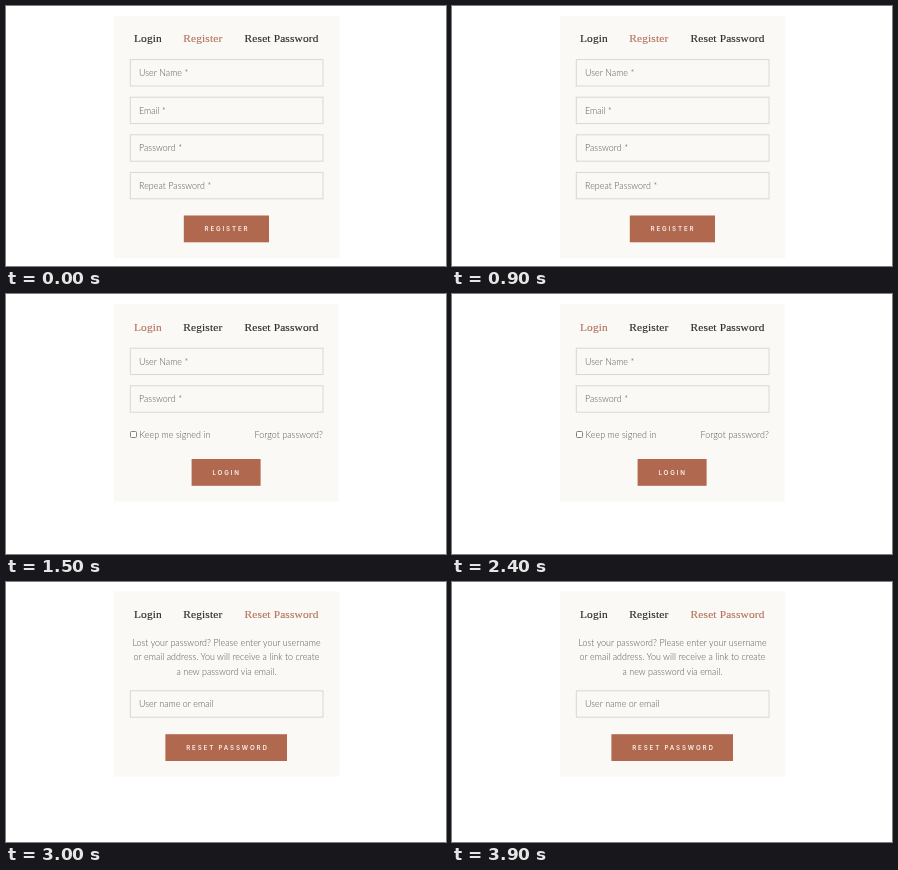
Write an HTML page that moves like this. It is 440 px wide and 260 px high and loops after 4.5 s.

```html
<!DOCTYPE html>
<html lang="en">
<head>
<meta charset="utf-8">
<title>Account forms</title>
<style>
  html, body { margin: 0; width: 100%; height: 100%; overflow: hidden; background: #fff; }
  svg { display: block; width: 440px; height: 260px; }
  .panel { fill: #faf9f5; }
  .tab { font: 11.4px "Liberation Serif", serif; letter-spacing: .15px; fill: #2b2b29; stroke: #2b2b29; stroke-width: .15; }
  .tab.on { fill: #b5735b; stroke: #b5735b; }
  .body { font: 300 8.9px Lato, sans-serif; letter-spacing: .05px; fill: #555; }
  .box { fill: none; stroke: #d9d8d4; }
  .check { fill: #fff; stroke: #777; stroke-width: .9; }
  .button { fill: #b0694f; }
  .label { font: 600 6.2px Inter, sans-serif; letter-spacing: 1.85px; fill: #fbf3ef; }
</style>
</head>
<body>
<svg id="stage" viewBox="0 0 440 260"></svg>
<script>
const STEP = 1500;
const TABS = [["Login", 128], ["Register", 177.2], ["Reset Password", 238.6]];
const stage = document.getElementById("stage");

function add(parent, tag, attrs, text) {
  const el = document.createElementNS("http://www.w3.org/2000/svg", tag);
  for (const key in attrs) el.setAttribute(key, attrs[key]);
  if (text) el.textContent = text;
  parent.append(el);
  return el;
}

const rect = (g, cls, x, y, width, height, rx = 0) =>
  add(g, "rect", { class: cls, x, y, width, height, rx });

const write = (g, cls, text, x, y, anchor = "start") =>
  add(g, "text", { class: cls, x, y, "text-anchor": anchor }, text);

function field(g, text, y) {
  rect(g, "box", 124.3, y, 192.7, 26.4);
  write(g, "body", text, 133, y + 16.4);
}

function button(g, text, x, y, width) {
  rect(g, "button", x, y, width, 26.8);
  write(g, "label", text, x + 20.8, y + 15.7);
}

function screen(active, top, bottom, right, tabY) {
  const g = add(stage, "g", {});
  rect(g, "panel", 108, top, right - 108, bottom - top);
  TABS.forEach(([name, x], i) => write(g, i === active ? "tab on" : "tab", name, x, tabY));
  return g;
}

const register = screen(1, 9.6, 252.2, 333.4, 36.4);
["User Name *", "Email *", "Password *", "Repeat Password *"]
  .forEach((name, i) => field(register, name, 53.6 + i * 37.6));
button(register, "REGISTER", 177.8, 209.5, 85.2);

const login = screen(0, 9.6, 207.7, 332.5, 36.8);
field(login, "User Name *", 54.2);
field(login, "Password *", 91.8);
rect(login, "check", 124.5, 137.5, 6, 6, 1);
write(login, "body", "Keep me signed in", 133.5, 144);
write(login, "body", "Forgot password?", 316.8, 144, "end");
button(login, "LOGIN", 185.6, 165, 69);

const reset = screen(2, 9.3, 194.6, 333.4, 36.4);
["Lost your password? Please enter your username",
 "or email address. You will receive a link to create",
 "a new password via email."]
  .forEach((line, i) => write(reset, "body", line, 220.5, 63.5 + i * 14.5, "middle"));
field(reset, "User name or email", 108.8);
button(reset, "RESET PASSWORD", 159.4, 152.2, 121.6);

const screens = [register, login, reset];
const start = performance.now();

function draw(now) {
  const shown = Math.floor(Math.max(0, now - start) / STEP) % screens.length;
  screens.forEach((g, i) => g.setAttribute("visibility", i === shown ? "visible" : "hidden"));
  requestAnimationFrame(draw);
}
draw(start);
</script>
</body>
</html>
```
